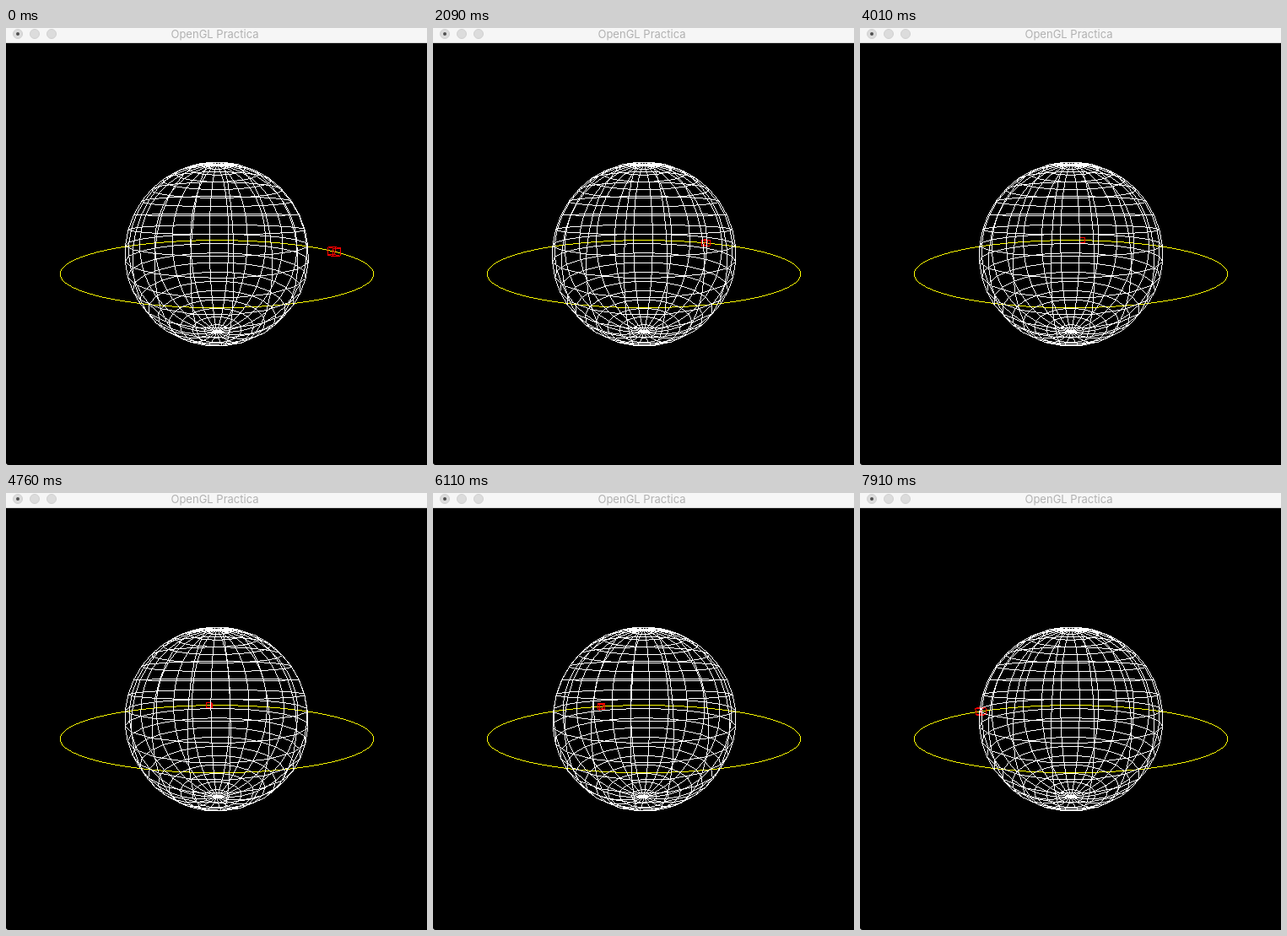
An HTML page with a canvas for the animation above (8 s loop, 499x518 px).

```html
<!DOCTYPE html>
<html lang="en">
<head>
<meta charset="utf-8">
<title>OpenGL Practica</title>
<style>
  html, body { margin: 0; width: 100%; height: 100%; overflow: hidden; background: #fff; }
  #bar { position: absolute; left: 0; top: 0; box-sizing: border-box; width: 499px; height: 18px;
    background: #f6f6f6; border-bottom: 1px solid #d1d1d1; }
  #bar i { position: absolute; top: 1px; box-sizing: border-box; width: 12px; height: 12px;
    border: 1px solid #d1d1d1; border-radius: 50%; background: #dcdcdc; }
  #bar i:first-child::after { content: ""; position: absolute; left: 3px; top: 3px;
    width: 4px; height: 4px; border-radius: 50%; background: #505050; }
  #bar span { position: absolute; left: 0; top: -1px; width: 495px; text-align: center;
    font: 13px/17px Inter, "Liberation Sans", sans-serif; color: #b1b1b1; white-space: nowrap; }
  canvas { position: absolute; left: 0; top: 18px; border-bottom-left-radius: 3px; }
</style>
</head>
<body>
<div id="bar">
  <i style="left:8px"></i><i style="left:28px"></i><i style="left:48px"></i>
  <span>OpenGL Practica</span>
</div>
<canvas width="499" height="500"></canvas>
<script>
const W = 499, H = 500, RAD = Math.PI / 180;
const WHITE = 0xffffffff, YELLOW = 0xff00ffff, RED = 0xff0000ff, BLACK = 0xff000000;
const ctx = document.querySelector("canvas").getContext("2d");
const image = ctx.createImageData(W, H);
const pixels = new Uint32Array(image.data.buffer);

// 90 degree view from 5 units away, tilted down by 10 degrees
const FOCAL = 250, DISTANCE = 5, SIN = Math.sin(10 * RAD), COS = Math.cos(10 * RAD);
const GLOBE = 2, ORBIT = 3, HALF = 0.1;

// Angle 0 is the far side; positive angles lie to the right
function project(angle, radius, height, side = 0) {
  const s = Math.sin(angle * RAD), c = Math.cos(angle * RAD);
  const x = radius * s + side * c, z = side * s - radius * c;
  const k = FOCAL / (DISTANCE - z * COS - height * SIN);
  return [250 + x * k, 250 - (height * COS - z * SIN) * k];
}

// One pixel wide line without smoothing, sampled at pixel centres
function line(p, q, color) {
  const main = Math.abs(q[0] - p[0]) >= Math.abs(q[1] - p[1]) ? 0 : 1, other = 1 - main;
  if (p[main] > q[main]) [p, q] = [q, p];
  const slope = (q[other] - p[other]) / (q[main] - p[main]);
  for (let a = Math.ceil(p[main] - 0.5); a < q[main] - 0.5; a++) {
    const b = Math.floor(p[other] + (a + 0.5 - p[main]) * slope);
    pixels[main ? a * W + b : b * W + a] = color;
  }
}

function drawOrbit() {
  for (let a = 0; a < 360; a += 3)
    line(project(a, ORBIT, 0), project(a + 3, ORBIT, 0), YELLOW);
}

function drawCube(angle) {
  const corner = i => project(angle, ORBIT + (i & 1 ? HALF : -HALF),
    i & 2 ? HALF : -HALF, i & 4 ? HALF : -HALF);
  for (let i = 0; i < 8; i++)
    for (const bit of [1, 2, 4])
      if (!(i & bit)) line(corner(i), corner(i | bit), RED);
}

function drawGlobe(turn) {
  const point = (lon, lat) =>
    project(lon + turn, GLOBE * Math.cos(lat * RAD), GLOBE * Math.sin(lat * RAD));
  for (let lon = 0; lon < 360; lon += 18)
    for (let lat = -90; lat < 90; lat += 9) {
      const p = point(lon, lat);
      line(p, point(lon, lat + 9), WHITE);
      line(p, point(lon + 18, lat), WHITE);
    }
}

function draw(step) {
  const turn = 83 - 36 / 13 * step;
  pixels.fill(BLACK);
  drawOrbit();
  drawCube(turn);
  drawGlobe(turn);
  ctx.putImageData(image, 0, 0);
}

// The picture advances about every 150 ms, a few steps being shorter
const SHORT = [7, 19, 20, 21];
function stepAt(time) {
  let step = 0;
  for (; step < 53; step++) {
    time -= SHORT.includes(step) ? 140 : 150;
    if (time < 0) break;
  }
  return step;
}

const start = performance.now();
let shown = -1;
function tick() {
  const step = stepAt((performance.now() - start) % 8000);
  if (step !== shown) draw(shown = step);
  requestAnimationFrame(tick);
}
tick();
</script>
</body>
</html>
```
